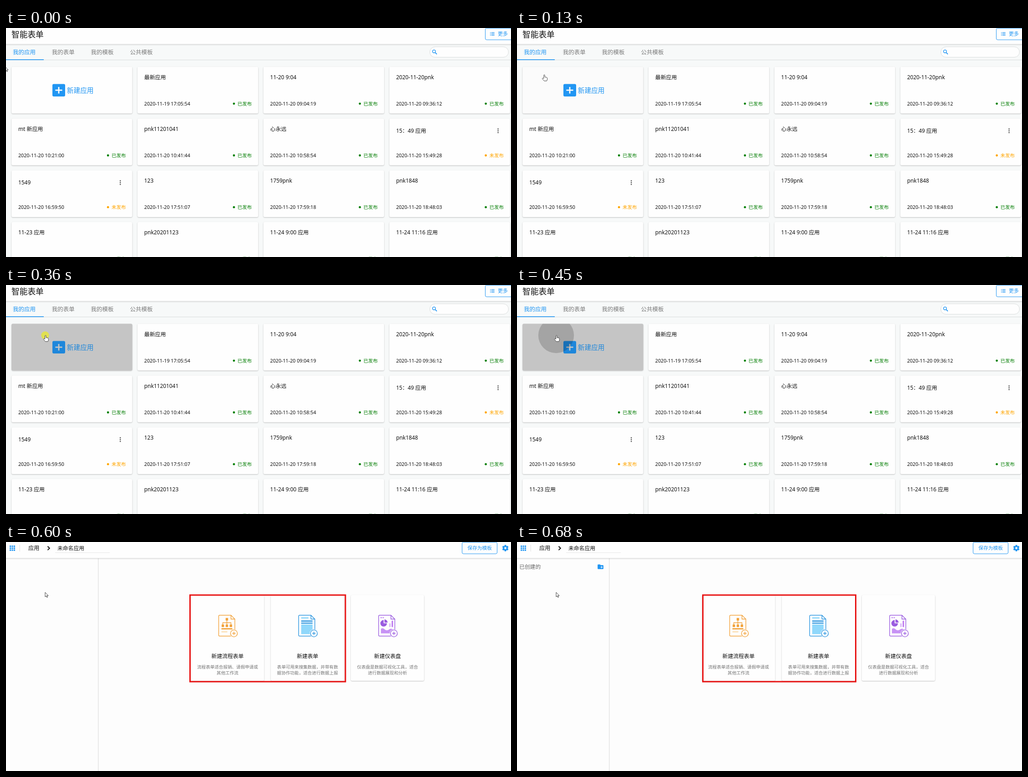
An HTML page for the animation above (0.76 s loop, 1110 by 505 pixels).

```html
<!DOCTYPE html>
<html lang="zh-CN">
<head>
<meta charset="utf-8">
<style>
  html, body { margin: 0; width: 100%; height: 100%; overflow: hidden; background: #fdfdfd; }
  svg { display: block; width: 100vw; height: 100vh; }
  text { font-family: "Noto Sans", "Noto Sans CJK SC", "Noto Sans CJK", sans-serif; }
  .card { filter: drop-shadow(0 1px 1px rgba(0, 0, 0, .24)); }
  .header { filter: drop-shadow(0 1px 1.5px rgba(0, 0, 0, .2)); }
</style>
</head>
<body>
<svg id="stage" viewBox="0 0 1110 505"></svg>
<script>
const BLUE = '#2196f3', GREEN = '#0a800a', ORANGE = '#ffa500', WHITE = '#fefefe';

const rect = (x, y, w, h, fill, extra = '') =>
  `<rect x="${x}" y="${y}" width="${w}" height="${h}" fill="${fill}" ${extra}/>`;
const circle = (x, y, r, fill, extra = '') =>
  `<circle cx="${x}" cy="${y}" r="${r}" fill="${fill}" ${extra}/>`;
const line = (d, color, width = 1, fill = 'none') =>
  `<path d="${d}" stroke="${color}" stroke-width="${width}" fill="${fill}"/>`;
const shape = (d, fill) => `<path d="${d}" fill="${fill}" fill-rule="evenodd"/>`;
const label = (x, y, size, words, fill = '#111', anchor = 'start') =>
  `<text x="${x}" y="${y}" font-size="${size}" fill="${fill}" text-anchor="${anchor}">${words}</text>`;
const at = (x, y, content) => `<g transform="translate(${x} ${y})">${content}</g>`;
const header = () => rect(-5, -5, 1120, 40.5, WHITE, 'class="header"');
const outlined = (x, w) => rect(x, .5, w, 25.5, WHITE, `rx="3" stroke="${BLUE}"`);

// Application list
const apps = [
  ['最新应用', '2020-11-19 17:05:54'],
  ['11-20 9:04', '2020-11-20 09:04:19'],
  ['2020-11-20pnk', '2020-11-20 09:36:12'],
  ['mt 新应用', '2020-11-20 10:21:00'],
  ['pnk11201041', '2020-11-20 10:41:44'],
  ['心永远', '2020-11-20 10:58:54'],
  ['15：49 应用', '2020-11-20 15:49:28', true],
  ['1549', '2020-11-20 16:59:50', true],
  ['123', '2020-11-20 17:51:07'],
  ['1759pnk', '2020-11-20 17:59:18'],
  ['pnk1848', '2020-11-20 18:48:03'],
  ['11-23 应用', '2020-11-23 09:12:30'],
  ['pnk20201123', '2020-11-23 10:20:16'],
  ['11-24 9:00 应用', '2020-11-24 09:00:25'],
  ['11-24 11:16 应用', '2020-11-24 11:16:42'],
];

function appCard([title, date, draft], index) {
  const slot = index + 1, color = draft ? ORANGE : GREEN;
  const menu = [-4, 0, 4].map(dy => circle(239, 27 + dy, 1.4, '#616161')).join('');
  return at(12.2 + slot % 4 * 276.8, 85.5 + Math.floor(slot / 4) * 114.2,
    rect(0, 0, 265.3, 103, WHITE, 'rx="3" class="card"') +
    label(14.8, draft ? 31 : 27, 11.9, title) +
    label(14.8, 85.2, 10.7, date) +
    circle(212, 81.3, 2.4, color) +
    label(219.8, 85.2, 10.5, draft ? '未发布' : '已发布', color) +
    (draft ? menu : ''));
}

const tabs = ['我的应用', '我的表单', '我的模板', '公共模板'];
const listIcon = [10, 13, 16].map(y =>
  rect(1064, y - .6, 1.5, 1.3, BLUE) + rect(1066.7, y - .6, 7, 1.3, BLUE)).join('');

const listView = `<g id="list">
  ${rect(0, 0, 1110, 505, '#f7f9f9')}
  ${rect(0, 70, 1110, 1, '#d9dcdc')}
  ${header()}
  ${label(12, 21, 17.7, '智能表单')}
  ${outlined(1053.5, 70)}${listIcon}${label(1081, 17.2, 11, '更多', BLUE)}
  ${tabs.map((tab, i) => label(15 + i * 85.8, 58, 12.5, tab, i ? '#7b7b7b' : BLUE)).join('')}
  ${rect(0, 69, 83, 1.6, BLUE)}
  ${rect(931.5, 41.5, 173, 23, WHITE, 'rx="11.5" stroke="#dadddd"')}
  ${line('M943.6 54.4L947 57.8', BLUE, 1.8)}
  ${circle(940.8, 51.6, 3.2, 'none', `stroke="${BLUE}" stroke-width="1.4"`)}
  ${apps.map(appCard).join('')}
  ${rect(12.2, 85.5, 265.3, 103, WHITE, 'rx="3" class="card" id="newCard"')}
  <g id="newLabel">
    ${shape('M105 123.5h22q3 0 3 3v21.5q0 3-3 3h-22q-3 0-3-3v-21.5q0-3 3-3z' +
      'M114.6 130v5.8h-6.2v2.8h6.2v5.8h2.8v-5.8h6.2v-2.8h-6.2v-5.8z', 'currentColor')}
    ${label(133.8, 143, 14.7, '新建应用', 'currentColor')}
  </g>
  <clipPath id="cardClip">${rect(12.2, 85.5, 265.3, 103, '#000', 'rx="3"')}</clipPath>
  <g clip-path="url(#cardClip)">${circle(86, 111, 0, '#000', 'id="ripple" opacity=".17"')}</g>
</g>`;

// Blank application
function documentIcon(color, content) {
  return line('M2 0H27L35.5 8.5V44q0 2-2 2H2q-2 0-2-2V2q0-2 2-2z', color, 1.4, WHITE) +
    line('M27 0V8.5H35.5', color, 1.4) + content +
    circle(33.5, 40, 9.2, WHITE) +
    circle(33.5, 40, 7.6, WHITE, `stroke="${color}" stroke-width="1.4"`) +
    line('M33.5 36.3v7.4M29.8 40h7.4', color, 1.4);
}

const flowIcon = documentIcon('#f2a33c',
  rect(15.3, 6, 5.4, 5.6, '#f2a33c') +
  line('M18 11V21M9 21V16.5H27V21', '#f2a33c', 1.4) +
  [6.5, 15.3, 24.1].map(x => rect(x, 20.5, 5.4, 5.6, '#f2a33c')).join('') +
  rect(6, 28.5, 24, 2.8, '#f2a33c') + rect(6, 35.3, 13, 2.6, '#fbdfb4'));

const formIcon = documentIcon('#2e97e0',
  rect(5.5, 4.5, 16, 2.8, '#90d8fb') +
  rect(5.5, 11.5, 25, 2.6, '#2e97e0') + rect(5.5, 16.2, 25, 2.4, '#2e97e0') +
  rect(5.5, 20.3, 25, 21.5, '#90d8fb'));

const chartIcon = documentIcon('#9b5de0',
  rect(4, 4, 3, 2.6, '#c792f5') + rect(8.5, 4, 3, 2.6, '#c792f5') +
  shape('M11 10.5V17.8H18.3A7.3 7.3 0 1 1 11 10.5z', '#9b5de0') +
  shape('M12.7 9.3A7 7 0 0 1 19.7 16.3H12.7z', '#9b5de0') +
  rect(23.3, 18, 3, 8, '#d9b6f8') + rect(28.5, 12, 3.2, 14, '#c07cf2') +
  shape('M5 30q4-3 8 1t9 1q4-4 9-1v9H5z', '#c792f5'));

const choices = [
  ['新建流程表单', flowIcon, '流程表单适合报销、请假申请或', '其他工作流'],
  ['新建表单', formIcon, '表单可用来搜集数据，并带有数', '据协作功能，适合进行数据上报'],
  ['新建仪表盘', chartIcon, '仪表盘是数据可视化工具，适合', '进行数据展现和分析'],
];

const choiceCard = ([title, icon, ...lines], i) => at(406.3 + i * 175.8, 117,
  rect(0, 0, 161, 189, WHITE, 'rx="3" class="card"') +
  at(61.2, 44.5, icon) +
  label(80.7, 138.5, 11.8, title, '#111', 'middle') +
  lines.map((words, row) => label(80.7, 162.2 + row * 12.7, 9.57, words, '#757575', 'middle')).join(''));

const gridIcon = [0, 1, 2].flatMap(row => [0, 1, 2].map(col =>
  rect(8 + col * 4.4, 7.8 + row * 4.3, 3.2, 3.1, BLUE))).join('');
const gearTeeth = [0, 60, 120].map(angle =>
  rect(-2, -7, 4, 14, BLUE, `rx=".7" transform="rotate(${angle})"`)).join('');

const editorView = `<g id="editor">
  ${rect(0, 0, 1110, 505, '#fdfdfd')}
  ${rect(202.3, 36, 1.2, 469, '#dedede')}
  ${header()}
  ${gridIcon}${rect(29.5, 6, 1, 15, '#e0e0e0')}
  ${label(49, 17.7, 12.2, '应用')}
  ${line('M91.5 9.5L95.7 13.7L91.5 17.9', '#111', 2)}
  ${label(113, 17.7, 11.8, '未命名应用')}
  ${rect(108, 23, 120, 1, '#e6e6e6')}
  ${outlined(1002.5, 77)}${label(1014.3, 17.2, 10.75, '保存为模板', BLUE)}
  ${at(1097.6, 13.5, gearTeeth + circle(0, 0, 5.2, BLUE) + circle(0, 0, 2.4, WHITE))}
  ${choices.map(choiceCard).join('')}
  ${rect(0, 117, 0, 191, 'none', 'id="frame" stroke="#e81313" stroke-width="3"')}
  <g id="created">
    ${label(5, 59.2, 11.8, '已创建的', '#666')}
    ${shape('M178.5 49.5h4l1.4 1.5h4.8q1.3 0 1.3 1.3v6.2q0 1.3-1.3 1.3h-10.2q-1.3 0-1.3-1.3v-7.7q0-1.3 1.3-1.3z', BLUE)}
    ${line('M186 53v5M183.5 55.5h5', WHITE, 1.2)}
  </g>
</g>`;

const pointer = `<g id="pointer">
  ${circle(0, 0, 8.7, '#e0e052', 'id="press"')}
  <g id="arrow">${line('M0 0V10L2.3 7.9L3.9 11.3L5.5 10.6L3.9 7.3H7Z', '#333', .9, '#fff')}</g>
  <g id="hand">${line('M-.4 8V1.2Q-.2 .1 .8 .1T2 1.2V5L6 5.8Q7.3 6.2 7.3 7.6V10Q7.2 12 6 13.7H.6L-3.3 9.4Q-4-.1-3.2 7.6Q-2 6.8-.4 8.4Z'.replace('Q-4-.1-3.2 7.6', 'Q-4.2 8.2-3.2 7.6'), '#333', .9, '#fff')}</g>
</g>`;

document.getElementById('stage').innerHTML = listView + editorView + pointer;

const $ = id => document.getElementById(id);
const show = (id, visible) => $(id).setAttribute('display', visible ? 'inline' : 'none');
const clamp = v => Math.max(0, Math.min(1, v));

const LOOP = 760, PRESS = 360, OPEN = 600, LOADED = 680;
const ticks = [0, 130, 210, 290, PRESS, 450, 530, OPEN, LOADED];

function draw(time) {
  // The screen refreshes only at these ticks.
  const t = ticks.findLast(tick => tick <= time);
  const travel = 1 - (1 - clamp(t / 290)) ** 2;
  const hovering = t >= 130 && t < 530;
  const pressed = t >= PRESS;

  show('list', t < OPEN);
  show('editor', t >= OPEN);
  show('created', t >= LOADED);

  const shade = pressed ? 197 : 254 - 10 * clamp((t - 50) / 240);
  $('newCard').setAttribute('fill', `rgb(${shade},${shade},${shade})`);
  $('newLabel').style.color = pressed ? '#1e87db' : t >= 290 ? '#2090ea' : BLUE;
  $('ripple').setAttribute('r', 74 * clamp((t - PRESS) / 170));

  $('pointer').setAttribute('transform', `translate(${-2 + 88 * travel} ${85 + 26 * travel})`);
  show('hand', hovering);
  show('arrow', !hovering);
  show('press', t === PRESS);

  const left = t >= LOADED ? 408.5 : 404.5, right = t >= LOADED ? 744.5 : 746;
  $('frame').setAttribute('x', left);
  $('frame').setAttribute('width', right - left);
}

const start = performance.now();
function tick() {
  draw((performance.now() - start) % LOOP);
  requestAnimationFrame(tick);
}
tick();
</script>
</body>
</html>
```
